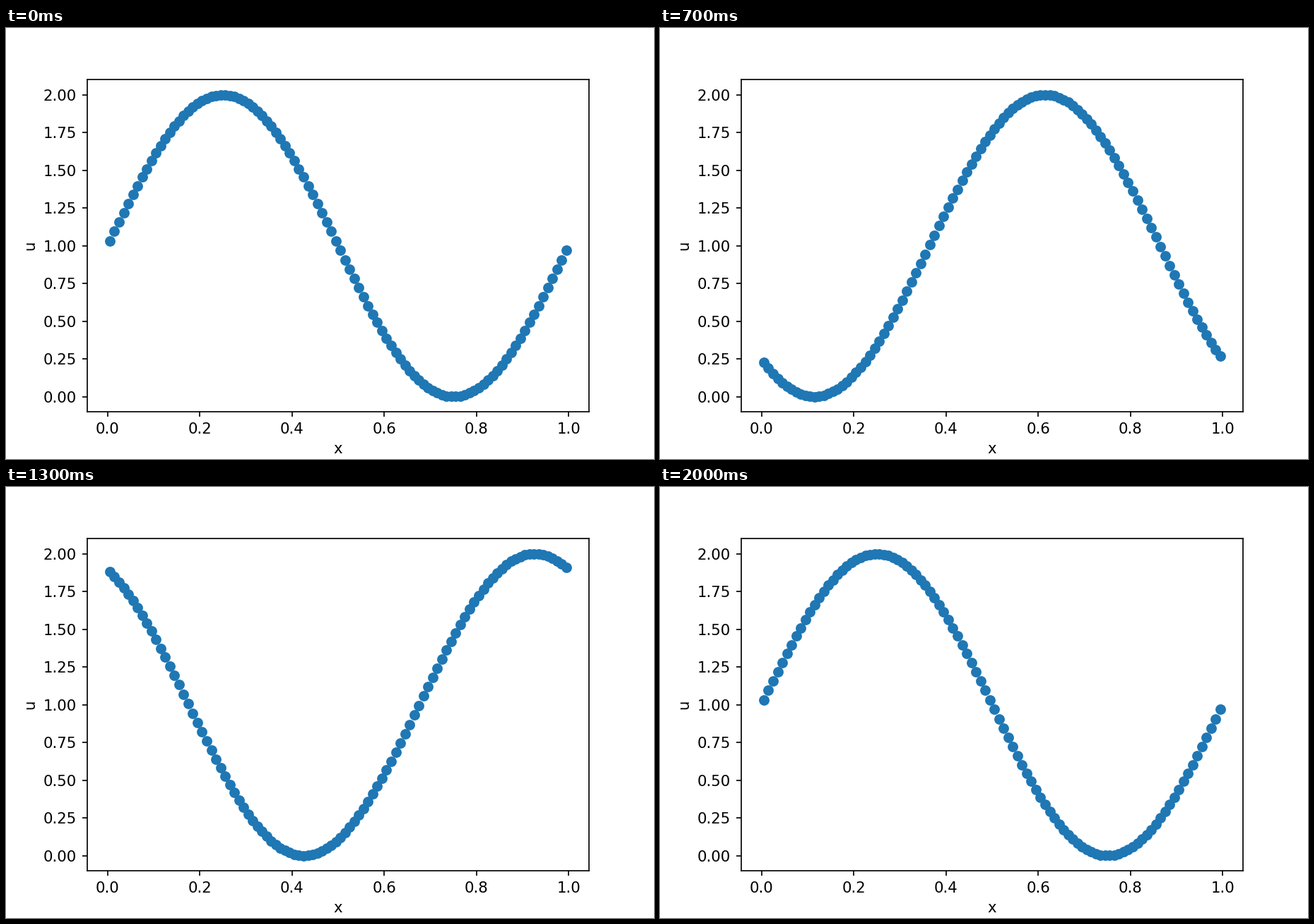
Write a matplotlib script that moves like this. It is 917x611 px and loops after 2100 ms.

```python
import numpy as np
import matplotlib.pyplot as plt
from matplotlib.animation import FuncAnimation

FRAMES = 21
STEP = 0.052   # time advanced per frame
T_END = 1.0
CELLS = 100

plt.rcParams["font.family"] = "DejaVu Sans"

# Cell centres of a periodic unit domain
x = (np.arange(CELLS) + 0.5) / CELLS


def wave(t):
    """Sine profile carried to the right at unit speed."""
    return 1 + np.sin(2 * np.pi * (x - t))


fig, ax = plt.subplots(figsize=(6.0033, 4), dpi=152.75)  # 917 x 611 px
fig.subplots_adjust(left=0.125, right=0.9, bottom=0.11, top=0.88)
dots, = ax.plot(x, wave(0), "o", color="#1f77b4")
ax.set_xlabel("x")
ax.set_ylabel("u")
ax.set_xlim(ax.get_xlim())
ax.set_ylim(ax.get_ylim())


def update(i):
    dots.set_ydata(wave(min(i * STEP, T_END)))
    return dots,


anim = FuncAnimation(fig, update, frames=FRAMES, interval=100,
                     repeat=True, repeat_delay=0)
plt.show()
```
